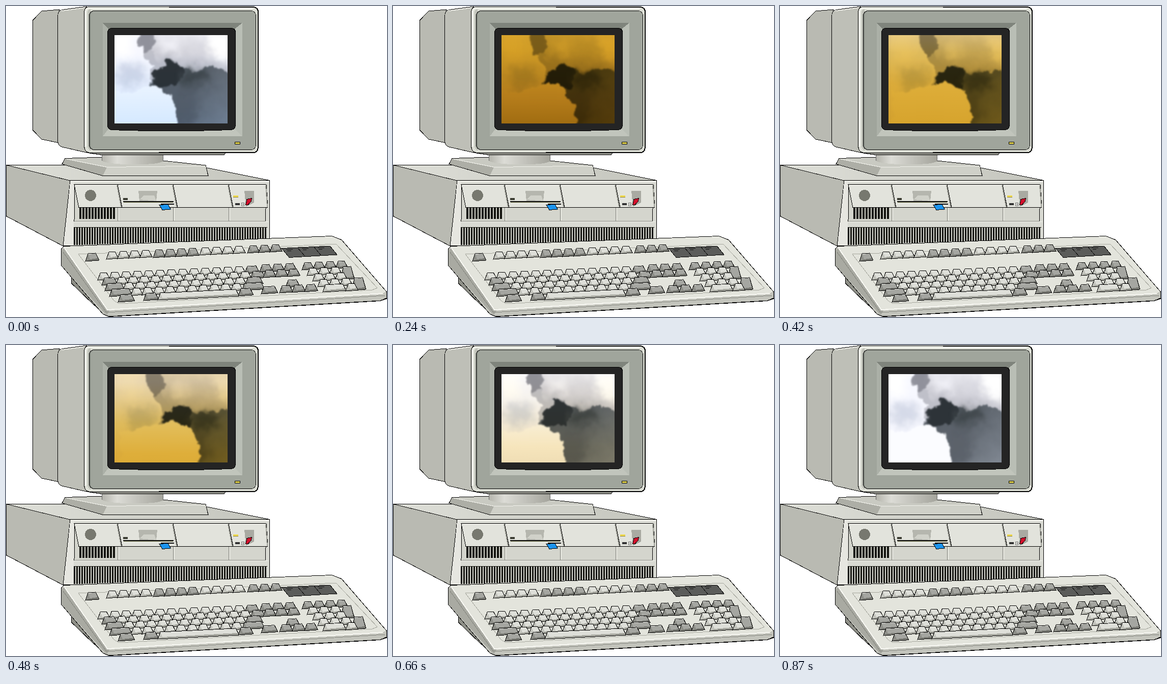
An HTML page for the animation above (0.9 s loop, 748 px wide and 609 px high).

```html
<!DOCTYPE html>
<html lang="en">
<head>
<meta charset="utf-8">
<title>Desktop computer</title>
<style>
html, body { margin: 0; width: 100%; height: 100%; overflow: hidden; background: #fff; }
svg { display: block; width: 748px; height: 609px; }
.ln { stroke: #000; stroke-width: 1; }
.screen { isolation: isolate; }
.tint { mix-blend-mode: multiply; animation: scroll 900ms steps(30) -5ms infinite; }
.drift { animation: drift 900ms linear infinite; }
.puff { animation: puff 900ms linear infinite; }
.cool { mix-blend-mode: multiply; animation: cool 900ms linear infinite; }
@keyframes scroll { to { transform: translateY(930px); } }
@keyframes drift { 53% { transform: translate(20px, 9px); } 73% { transform: translate(3px, 1px); } }
@keyframes puff { 53% { transform: translate(25px, -17px); } 73% { transform: translate(0, 0); } }
@keyframes cool { 0% { opacity: 1; } 25%, 97% { opacity: 0; } }
</style>
</head>
<body>
<svg viewBox="0 0 748 609" shape-rendering="crispEdges" fill="none">
  <defs>
    <clipPath id="glass"><rect x="213" y="57" width="222" height="173"/></clipPath>
    <filter id="soft" filterUnits="userSpaceOnUse" x="170" y="20" width="310" height="250" color-interpolation-filters="sRGB">
      <feGaussianBlur stdDeviation="3"/>
      <feTurbulence type="fractalNoise" baseFrequency=".045" numOctaves="4" seed="8" result="n"/>
      <feDisplacementMap in2="n" in="SourceGraphic" scale="24" xChannelSelector="R" yChannelSelector="G"/>
      <feGaussianBlur stdDeviation="1.8"/>
    </filter>
    <filter id="wide" x="-50%" y="-50%" width="200%" height="200%"><feGaussianBlur stdDeviation="8"/></filter>
    <linearGradient id="warm" x1="0" y1="1" x2="0" y2="0">
      <stop offset="0" stop-color="#6c4600"/><stop offset=".05" stop-color="#9a660c"/>
      <stop offset=".12" stop-color="#b67c1a"/><stop offset=".22" stop-color="#d6a026"/>
      <stop offset=".34" stop-color="#e2b03a"/><stop offset=".4" stop-color="#e6c05c"/>
      <stop offset=".48" stop-color="#eedaae"/><stop offset=".54" stop-color="#fae8bc"/>
      <stop offset=".63" stop-color="#fffaec"/><stop offset=".7" stop-color="#fff"/>
    </linearGradient>
    <linearGradient id="blue" x1="0" y1="0" x2="0" y2="1">
      <stop offset=".2" stop-color="#fff"/><stop offset="1" stop-color="#d9ecff"/>
    </linearGradient>
    <linearGradient id="gloom" x1="0" y1="0" x2="1" y2="1">
      <stop offset=".35" stop-color="#4a5158"/><stop offset=".65" stop-color="#666d76"/><stop offset="1" stop-color="#9aa2ae"/>
    </linearGradient>
    <linearGradient id="bank" x1="0" y1="1" x2=".3" y2="0">
      <stop offset="0" stop-color="#a4a5ae"/><stop offset=".5" stop-color="#d2d2da"/><stop offset="1" stop-color="#fafaff"/>
    </linearGradient>
    <linearGradient id="neck">
      <stop offset="0" stop-color="#b4b4ac"/><stop offset=".25" stop-color="#dcdcd6"/><stop offset="1" stop-color="#a4a49c"/>
    </linearGradient>
    <linearGradient id="lid">
      <stop offset="0" stop-color="#dedfd8"/><stop offset="1" stop-color="#c4c5bd"/>
    </linearGradient>
  </defs>

  <!-- system unit -->
  <path class="ln" fill="url(#lid)" d="M.5 311.5H110L395 317L517.5 341.5L126 342Z"/>
  <path class="ln" fill="#b9bab2" d="M.5 311.5L126 342L112 470L.5 411.5Z"/>
  <path class="ln" fill="#d9dad3" d="M126 341.5H517.5V460L112 470Z"/>
  <path stroke="#f4f4ee" stroke-width="2" d="M127 343.5H516"/>
  <path fill="#e6e6e0" d="M126 344H134L132 469H113Z"/>
  <path class="ln" fill="#d4d5cd" d="M134.5 349.5H511L509.5 421.5H134Z"/>
  <path stroke="#85867f" d="M219.5 394V421M328.5 394V421M437.5 394V421M134 421.5H510"/>
  <path stroke="#f4f4ee" d="M134 422.5H515M221.5 395V420M330.5 395V420M439.5 395V420"/>
  <g id="bays"></g>
  <g id="vents"></g>
  <circle cx="166" cy="371" r="11" fill="#77786f"/>
  <path fill="#b5b6ae" d="M260 362H297L295 382H262Z"/>
  <path fill="#d0d1c9" d="M262 379L270 371H291L295 382Z"/>
  <path fill="#3b3c32" d="M230 376h9v4h-9z"/>
  <path fill="#111" d="M230 382H329V384H230ZM304 387H330V389H304Z"/>
  <path stroke="#77784f" d="M231 384.5H328"/>
  <path class="ln" fill="#1c94ee" d="M301 389.5L318 388.5L323.5 398L307 399.5Z"/>
  <path fill="#efd94a" d="M446 371h10v3h-10z"/>
  <path stroke="#88804a" d="M446 374.5H456"/>
  <path fill="#a9aaa2" d="M468 362H487V385L471 393Z"/>
  <path class="ln" fill="#d3112c" d="M473 378.500L482.500 376.500L481 383L475 389.500H470.500Z"/>
  <path fill="#333" d="M450 386h9v4h-9z"/>
  <path stroke="#777" d="M462.5 385.500h5v6h-5zM464 388h3"/>

  <!-- stand -->
  <path class="ln" fill="#c9cac2" d="M116 298.500L188 296L309 303L392 312L397 332.500H190L110 309.500Z"/>
  <path fill="#adaea6" d="M117 299L198 316L190 332L111 309Z"/>
  <path fill="#cfd0c8" d="M198 315.500L392 313L396 332H191Z"/>
  <path stroke="#f0f0ea" d="M118 299.500L198 315.500L391 313"/>
  <path fill="url(#neck)" d="M188 288H309V304Q296 311 248 310Q198 310 188 303Z"/>
  <path stroke="#666" d="M188.500 288V303M308.500 288V304"/>
  <path class="ln" fill="#999a92" d="M160 287.500H431L428 291.500H188Z"/>

  <!-- monitor -->
  <path class="ln" fill="#b9bab2" d="M52.500 28L70 10L104 7V268L70 261L52.500 243Z"/>
  <path class="ln" fill="#bebfb7" d="M101.500 20Q102 9 110 7.500L158 1V287L110 276Q102 274 101.500 264Z"/>
  <path stroke="#e9e9e3" stroke-width="2" d="M108 9.500L156 3"/>
  <path fill="#dddfd6" stroke="#000" d="M162 1.500H486Q495 2 495 12V277Q495 287 486 287.500H164Q154 286 153.500 274V12Q154 2 162 1.500Z"/>
  <path stroke="#000" stroke-width="2" d="M320 2H486Q495 3 495 12V277Q494 287 486 287H300"/>
  <path stroke="#f0f1ea" stroke-width="3" d="M156 275V12Q157 4 164 4H484"/>
  <path fill="#c2c4bb" d="M160 12Q160 7 166 6V283Q160 280 160 274Z"/>
  <rect class="ln" x="163.500" y="9.500" width="327" height="272" rx="9" fill="#7d827b"/>
  <rect x="166" y="10" width="324" height="271" rx="8" fill="#a0a59c"/>
  <path fill="#7f847c" d="M190 33H464L449 45H201Z"/>
  <path fill="#abb0a7" d="M190 33L201 45V242L190 255Z"/>
  <path fill="#b9beb5" d="M464 33V255L449 242V45Z"/>
  <path fill="#c1c5bc" d="M190 255L201 241H449L464 255Z"/>
  <path class="ln" fill="#242424" d="M207 43.500H443Q450.500 44 450.500 52V234Q450 242 442 242.500Q325 247 207 242.500Q199.500 241 199.500 234V52Q200 44 207 43.500Z"/>
  <rect class="ln" x="449.500" y="266.500" width="10" height="4" fill="#e8d84c"/>

  <g class="screen" clip-path="url(#glass)">
    <g filter="url(#soft)">
      <rect x="160" y="10" width="330" height="270" fill="url(#gloom)"/>
      <g class="drift">
        <path fill="#5c626a" filter="url(#wide)" d="M325 165L372 160L375 215L345 245L325 230Z"/>
        <path fill="#90919b" d="M235 20H305L312 122L275 118Z"/>
        <path fill="#bfc0c9" d="M268 94L290 82L335 112L292 122L284 150Z"/>
        <path fill="url(#bank)" d="M282 20H480V150L436 136L410 119L390 117L366 129L348 120L328 106L300 108L286 84L292 66Z"/>
        <path fill="#fff" filter="url(#wide)" d="M392 50H470V112L425 108L400 92Z"/>
        <path fill="#f0f0f6" filter="url(#wide)" d="M298 62L335 58L345 86L306 92Z"/>
        <path fill="#2d3338" d="M287 130L304 115L325 108L346 119L350 140L335 155L312 162L288 154Z"/>
        <path fill="#3f464c" filter="url(#wide)" d="M345 126L394 124L398 146L350 160Z"/>
        <path fill="#f7f8ff" d="M130 10H247L262 76L276 96L285 118L281 152L300 164L310 270H130Z"/>
        <path fill="#d5dae8" filter="url(#wide)" d="M216 116L266 110L276 148L225 160Z"/>
        <path fill="#fff" filter="url(#wide)" d="M190 40H238L254 86L215 106Z"/>
      </g>
      <g class="drift"><g class="puff">
        <path fill="#fbfcff" d="M180 174L256 164L282 155L303 160L317 173L328 187L336 206L338 280H180Z"/>
      </g></g>
    </g>
    <rect class="cool" x="213" y="57" width="222" height="173" fill="url(#blue)"/>
    <rect class="tint" x="213" y="-943" width="222" height="1000" fill="url(#warm)"/>
  </g>

  <!-- keyboard -->
  <path class="ln" fill="#8f9088" d="M112 508L128.500 532V543L170 583L190 600Z"/>
  <path class="ln" fill="#c3c4bc" d="M113 470.500L640 450.500L659 458L747.500 560V573L735 577.500L202 608.500L190 603L108.500 508V476Z"/>
  <path fill="#a9aaa2" d="M109 478L116 474L203 596L198 606L109 508Z"/>
  <path fill="#e3e4dc" d="M114 471L640 451L658 459L746 559L738 564L205 596L196 592Z"/>
  <path stroke="#f8f8f3" stroke-width="2" d="M114 473L199 595L740 563"/>
  <path stroke="#85867f" d="M112 482L197 600L744 567"/>
  <path stroke="#000" d="M190 603L202 608L735 577L747 572"/>
  <path stroke="#a7a89f" d="M142 486L541 471L648 466L729 552L719 556L222 583L212 577Z"/>
  <path class="ln" fill="#5b5c5a" d="M541 474.500L636 470L650 487L556 492.500Z"/>
  <path stroke="#111" d="M572 473L587 490M604 471L619 489M550 477L563 476M552 480L560 479.500M581 475L594 474M583 478L590 477.500M612 474L625 473M614 477L621 476.500"/>
  <g id="keys"></g>
</svg>
<script>
const NS = 'http://www.w3.org/2000/svg';
const by = id => document.getElementById(id);
const poly = (parent, points, fill, line) => {
  const p = document.createElementNS(NS, 'polygon');
  p.setAttribute('points', points);
  p.setAttribute('fill', fill);
  if (line) p.setAttribute('stroke', line);
  parent.append(p);
};

// sloping drive covers
[[134, 219], [219, 328], [328, 437], [437, 511]].forEach(([a, b], i) => {
  const r = i < 3 ? b + 8 : b + 3;
  poly(by('bays'), [a, 349.5, b, 349.5, r, 394.5, a + 9, 394.5], '#e2e3dc', '#000');
  poly(by('bays'), [a + 1, 351, b - 1, 351, b - 1, 352, a + 2, 352], '#fafaf5');
  poly(by('bays'), [b - 2, 351, b, 351, r, 394, r - 2, 394], '#a3a49c');
});

const bars = (x0, x1, step, w, top, bottom) => {
  for (let x = x0; x < x1; x += step) {
    poly(by('vents'), [x, top, x + w, top, x + w, bottom(x), x, bottom(x)], '#14140f');
  }
};
bars(144, 212, 6, 4, 395, () => 417);
bars(133, 513, 5, 3, 434, x => 468 - (x - 133) * .033);
poly(by('vents'), [133, 433, 513, 433, 513, 434, 133, 434], '#14140f');

const DARK = ['#a5a6a1', '#777872', '#8d8e88'];
const LIGHT = ['#dedfd9', '#a6a79f', '#c2c3bc'];
const key = (x, y, w, tone, h = 14) => {
  const s = -w * .045, k = by('keys');
  const left = [x, y + h], right = [x + w + 3, y + h + s - 1];
  const a = [x + 5, y], b = [x + w - 4, y + s];
  const c = [x + w, y + h - 5 + s], d = [x + 9, y + h - 4];
  poly(k, [left, a, b, right], tone[1], '#000');
  poly(k, [left, a, d], tone[2]);
  poly(k, [a, b, c, d], tone[0]);
  poly(k, [a, b, [b[0], b[1] + 1], [a[0], a[1] + 1]], '#efefea');
  poly(k, [left, a, b, right], 'none', '#000');
};
const row = (x, y, n, pitch, tone, h) => {
  for (let i = 0; i < n; i++) key(x + i * pitch, y - i * pitch * .045, pitch - 1, tone, h);
};

// function row
key(156, 485, 24, DARK, 15);
row(197, 482, 4, 22, LIGHT);
row(289, 478, 4, 22, DARK, 15);
row(380, 474, 4, 22, LIGHT);
row(474, 470, 3, 22, DARK);

// typing block: first key, letter count, last key
[[180, 523, 0, 13, 26], [188, 533, 28, 12, 26], [194, 544, 36, 11, 32], [203, 555, 42, 10, 42]].forEach(([x, y, first, n, last], i) => {
  if (first) key(x, y, first, DARK);
  const lx = x + first, pitch = [22.2, 22, 21.8, 21.8][i];
  row(lx, y - first * .045, n, pitch, LIGHT);
  const ex = lx + n * pitch;
  key(ex, y - (ex - x) * .045, last, DARK);
});
key(220, 566, 30, DARK);
key(270, 563, 27, DARK);
key(298, 562, 157, LIGHT);
key(456, 554, 27, DARK);
key(501, 550, 30, DARK);

// navigation and arrows
row(498, 507, 3, 23.5, DARK);
row(505, 518, 3, 23.5, DARK);
key(549, 537, 25, DARK);
row(537, 548, 3, 24.5, DARK);

// number pad
row(581, 503, 4, 22, DARK);
row(591, 514, 3, 22, LIGHT);
key(657, 511, 24, DARK, 25);
row(602, 525, 3, 22, LIGHT);
row(612, 536, 3, 22, LIGHT);
key(679, 533, 25, DARK, 24);
key(622, 546, 43, LIGHT);
key(667, 544, 21, LIGHT);
</script>
</body>
</html>
```
